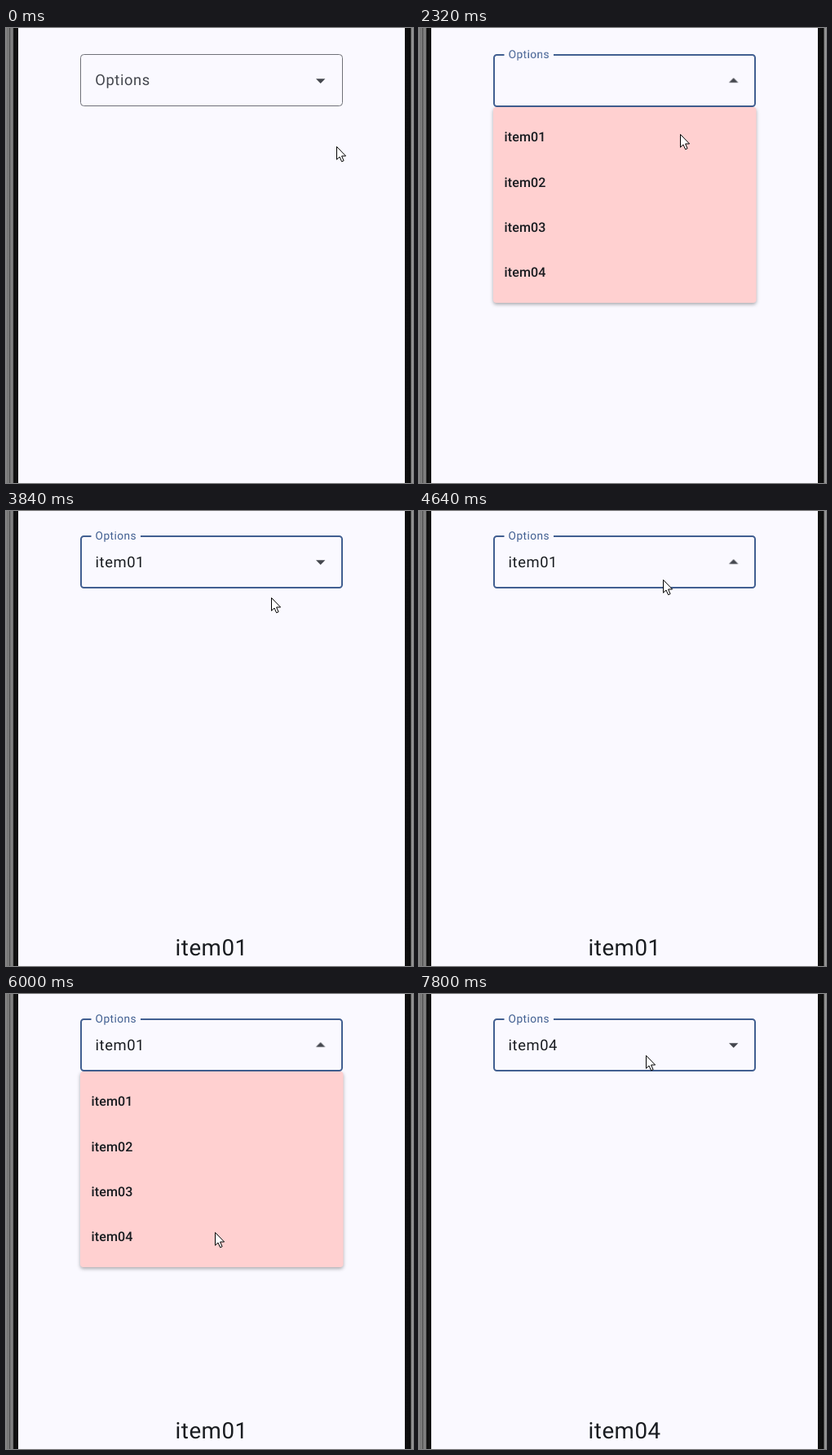
These frames come from a looping animation (499 by 558 pixels, 8000 ms). An HTML page:

```html
<!DOCTYPE html>
<html lang="en">
<head>
<meta charset="utf-8">
<title>Dropdown menu</title>
<style>
  html, body { margin: 0; width: 100%; height: 100%; overflow: hidden; background: #faf9ff; }
  svg { display: block; width: 499px; height: 558px; }
  text { font-family: Roboto, sans-serif; fill: #191c20; text-rendering: geometricPrecision; }

  .body { font-size: 18.4px; letter-spacing: .58px; }
  .items text { font-size: 16.1px; font-weight: 500; letter-spacing: .12px; }
  .result { font-size: 27.7px; letter-spacing: .55px; }
  .outline { fill: none; stroke: #6f7178; }
  .focus { fill: none; stroke: #415f91; stroke-width: 2; }
  .panel { fill: #ffd0d0; filter: drop-shadow(0 2px 2px rgba(0, 0, 0, .32)); }

  .layout, .label, .notch, .outline, .focus, .arrow, .menu, .press, .first, .second, .cursor {
    animation: 8s linear infinite;
  }
  .layout { animation-name: layout; animation-timing-function: step-end; }
  .label { animation-name: label; }
  .notch { animation-name: notch; transform-origin: 135px 32px; }
  .outline { animation-name: outline; }
  .focus { animation-name: focus; }
  .arrow { animation-name: arrow; animation-timing-function: step-end; transform-origin: 385.7px 64.6px; }
  .menu { animation-name: menu; transform-origin: 252px 97px; }
  .press { animation-name: press; opacity: 0; }
  .first { animation-name: first; animation-timing-function: step-end; }
  .second { animation-name: second; animation-timing-function: step-end; }
  .cursor { animation-name: cursor; }

  @keyframes layout {
    0% { transform: none; }
    37.5%, 100% { transform: translateY(-2px); }
  }
  @keyframes label {
    0%, 17.25% { transform: translate(109.2px, 70px); fill: #44474e; animation-timing-function: ease-in-out; }
    19.25%, 100% { transform: translate(109.6px, 37px) scale(.745); fill: #415f91; }
  }
  @keyframes notch {
    0%, 17.25% { transform: scaleX(0); }
    19.25%, 100% { transform: none; }
  }
  @keyframes outline {
    0%, 17.25% { opacity: 1; }
    19%, 100% { opacity: 0; }
  }
  @keyframes focus {
    0%, 17.25% { opacity: 0; }
    19%, 100% { opacity: 1; }
  }
  @keyframes arrow {
    0%, 37.5%, 75.75%, 100% { transform: none; }
    12.25%, 57% { transform: rotate(180deg); }
  }
  @keyframes menu {
    0%, 17.25%, 38.6%, 60.5%, 76.5%, 100% { transform: scale(.8); opacity: 0; animation-timing-function: ease-out; }
    19.5%, 37%, 62.5%, 75.25% { transform: none; opacity: 1; }
    38.5%, 76.4% { transform: none; opacity: 0; }
  }
  @keyframes press {
    0%, 34.7% { opacity: 0; }
    35.75%, 37% { opacity: .1; }
    38.5%, 100% { opacity: 0; }
  }
  @keyframes first {
    0%, 75.75%, 100% { visibility: hidden; }
    37.5% { visibility: visible; }
  }
  @keyframes second {
    0% { visibility: hidden; }
    75.75%, 100% { visibility: visible; }
  }
  @keyframes cursor {
    0%, .875% { transform: translate(405px, 145px); animation-timing-function: steps(4); }
    4.5% { transform: translate(380px, 107px); animation-timing-function: steps(4); }
    7.75% { transform: translate(352px, 63px); animation-timing-function: steps(3); }
    9.75%, 11.5% { transform: translate(359px, 78px); }
    13%, 24% { transform: translate(358px, 80px); animation-timing-function: steps(6); }
    29% { transform: translate(320px, 130px); animation-timing-function: steps(4); }
    32.25%, 34.75% { transform: translate(296px, 140px); }
    40.5%, 44% { transform: translate(300px, 144px); animation-timing-function: steps(2); }
    46% { transform: translate(326px, 124px); animation-timing-function: steps(2); }
    48% { transform: translate(325px, 106px); animation-timing-function: steps(3); }
    51% { transform: translate(290px, 62px); animation-timing-function: steps(4); }
    54%, 55.5% { transform: translate(300px, 82px); }
    58%, 62.5% { transform: translate(299px, 84px); animation-timing-function: steps(2); }
    64.5% { transform: translate(316px, 183px); animation-timing-function: step-end; }
    65.5% { transform: translate(302px, 245px); animation-timing-function: step-end; }
    66.5% { transform: translate(282px, 268px); animation-timing-function: steps(4); }
    70% { transform: translate(245px, 288px); animation-timing-function: step-end; }
    71.5%, 79% { transform: translate(256px, 292px); animation-timing-function: steps(3); }
    82% { transform: translate(262px, 299px); animation-timing-function: steps(5); }
    86.5% { transform: translate(277px, 281px); animation-timing-function: steps(2); }
    89%, 90% { transform: translate(325px, 206px); animation-timing-function: steps(6); }
    94.75% { transform: translate(267px, 64px); animation-timing-function: steps(4); }
    97.5%, 100% { transform: translate(278px, 75px); }
  }
</style>
</head>
<body>
<svg viewBox="0 0 499 558">
  <defs>
    <linearGradient id="left">
      <stop offset="0" stop-color="#a0a0a0"/>
      <stop offset=".09" stop-color="#666"/>
      <stop offset=".17" stop-color="#8a8a8a"/>
      <stop offset=".29" stop-color="#555"/>
      <stop offset=".42" stop-color="#858585"/>
      <stop offset=".56" stop-color="#777"/>
      <stop offset=".64" stop-color="#0e0e0e"/>
      <stop offset="1" stop-color="#141414"/>
    </linearGradient>
    <linearGradient id="right">
      <stop offset="0" stop-color="#111"/>
      <stop offset=".65" stop-color="#0c0c0c"/>
      <stop offset=".8" stop-color="#666"/>
      <stop offset=".9" stop-color="#b5b5b5"/>
      <stop offset="1" stop-color="#777"/>
    </linearGradient>
  </defs>

  <rect width="499" height="558" fill="#faf9ff"/>
  <rect width="15" height="558" fill="url(#left)"/>
  <rect x="489" width="10" height="558" fill="url(#right)"/>

  <g class="layout">
    <rect class="outline" x="91.5" y="32.5" width="321" height="63" rx="4"/>
    <rect class="focus" x="92" y="33" width="320" height="63" rx="3.5"/>
    <rect class="notch" x="104.5" y="30" width="60.5" height="5" fill="#faf9ff"/>
    <text class="body label">Options</text>
    <text class="body first" x="109.5" y="70.7">item01</text>
    <text class="body second" x="109.5" y="70.7">item04</text>
    <path class="arrow" d="M380 62.2h11.4l-5.7 5.7z" fill="#44474e"/>

    <g class="menu">
      <rect class="panel" x="91" y="97" width="322.5" height="240" rx="4"/>
      <rect class="press" x="91" y="106" width="322.5" height="55"/>
      <g class="items">
        <text x="104.5" y="139.2">item01</text>
        <text x="104.5" y="194.5">item02</text>
        <text x="104.5" y="249.9">item03</text>
        <text x="104.5" y="305.2">item04</text>
      </g>
    </g>
  </g>

  <text class="result first" x="207.5" y="544.5">item01</text>
  <text class="result second" x="207.5" y="544.5">item04</text>

  <path class="cursor" d="M.5 .5V16.3L4 13 6.6 18.8 9.1 17.7 6.6 12H11.6z" fill="#fff" stroke="#000"/>
</svg>
</body>
</html>
```
